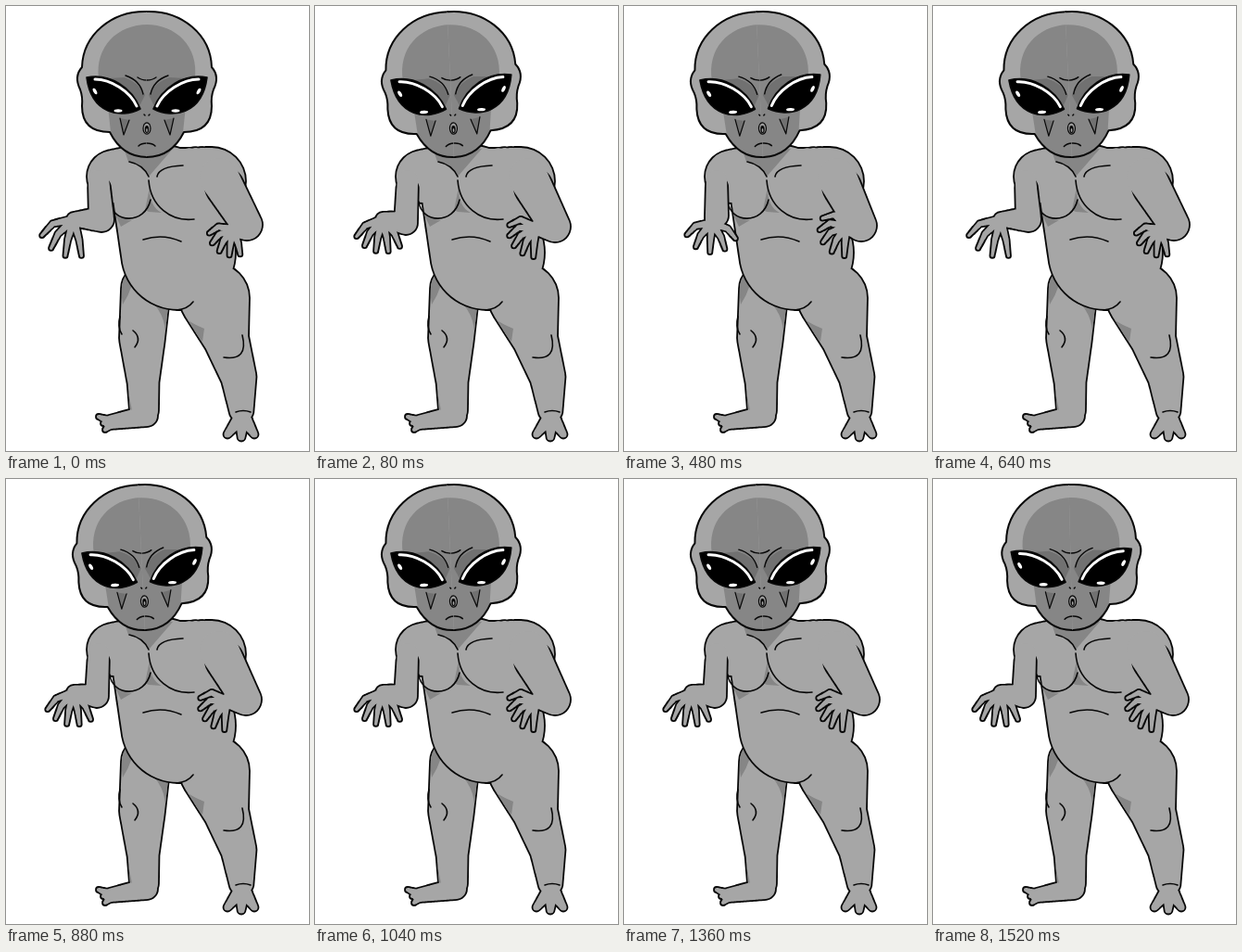
Animation of 327 by 480 pixels, one loop 1.6 s. Source, as an HTML page with a canvas:

```html
<!DOCTYPE html>
<html lang="en">
<head>
<meta charset="utf-8">
<title>Wiggling alien</title>
<style>
html, body { margin: 0; width: 100%; height: 100%; overflow: hidden; background: #fff; }
canvas { display: block; width: 327px; height: 480px; }
</style>
</head>
<body>
<canvas id="stage" width="327" height="480"></canvas>
<script>
const ctx = document.getElementById('stage').getContext('2d');
const SKIN = '#a6a6a6', SHADE = '#868686', DARK = '#717171', INK = '#080808';
const STEP = 80;
const HAND_CYCLE = [0, 1, 2, 1];
const HEAD_CYCLE = [0, -0.047, -0.047, -0.047, -0.025];

const mix = (a, b, t) => a + (b - a) * t;
const mixAll = (a, b, t) => a.map((v, i) => mix(v, b[i], t));

function fill(path, color) {
  ctx.fillStyle = color;
  ctx.fill(path);
}

function stroke(d, width = 1.6, color = INK) {
  ctx.lineWidth = width;
  ctx.strokeStyle = color;
  ctx.stroke(typeof d === 'string' ? new Path2D(d) : d);
}

// Union of tapered limbs; a limb is a chain of circles [x, y, radius]
function limbs(chains, grow) {
  const path = new Path2D();
  for (const chain of chains) {
    for (let i = 1; i < chain.length; i++) {
      const [a, b] = [chain[i - 1], chain[i]];
      const steps = Math.ceil(Math.hypot(b[0] - a[0], b[1] - a[1]));
      for (let s = 0; s <= steps; s++) {
        const [x, y, r] = mixAll(a, b, s / steps);
        path.moveTo(x + r + grow, y);
        path.arc(x, y, r + grow, 0, 2 * Math.PI);
      }
    }
  }
  return path;
}

const flesh = (chains, inked = chains) =>
  ({ ink: limbs(inked, 0.9), skin: limbs(chains, -0.9) });

function drawFlesh({ ink, skin }, shade) {
  fill(ink, INK);
  fill(skin, SKIN);
  if (!shade) return;
  ctx.save();
  ctx.clip(skin);
  fill(new Path2D(shade), SHADE);
  ctx.restore();
}

const toes = (ankle, tips, r) => tips.map(([x, y]) => [ankle, [x, y, r]]);

const leftLeg = flesh([
  [[151, 305, 27], [147, 358, 25], [148, 405, 17.5], [149, 436, 16]],
  [[152, 442, 12], [112, 449, 8]],
  ...toes([116, 449, 6], [[100, 443], [105, 450], [107, 457]], 3)
]);
const leftLegShade = 'M120 275H140Q140 300 126 322ZM142 306L190 325L172 352Q171 325 142 306Z' +
  'M118 370Q130 400 136 436L126 430Z';

const body = flesh([
  [[116, 184, 29], [158, 168, 22]],
  [[222, 189, 37], [168, 176, 22]],
  [[170, 205, 55], [186, 266, 62]],
  [[225, 315, 38], [237, 358, 25], [251, 400, 19.5], [254, 436, 13.5]],
  ...toes([255, 442, 9], [[239, 462], [254, 465], [268, 462]], 4.5)
]);
const bodyShade = 'M126 150L180 154L154 184Q147 172 132 168Z' +
  'M155 196Q155 217 168 223L154 222L150 220Z' +
  'M112 213Q119 230 136 231L124 238Z' +
  'M178 326Q196 341 214 348L212 362Z';
const bodyLines = [
  'M133 168Q148 171 154 184', 'M163 184Q165 173 191 172',
  'M112 211C115 235 150 236 156 209', 'M154 188C156 216 178 233 203 230',
  'M148 252Q169 245 189 254', 'M184 328Q196 327 202 319',
  'M137 350Q147 358 139 368', 'M123 335Q120 346 125 354',
  'M255 355Q262 383 235 379', 'M248 438Q256 435 264 438'
];

// Fingers fan out evenly between two angles and droop at the knuckle
function fan([x, y], from, to, count, reach) {
  return Array.from({ length: count }, (_, i) => {
    const angle = mix(from, to, i / (count - 1));
    const droop = mix(angle, 90, 0.45);
    const point = (px, py, deg, len, r) =>
      [px + len * Math.cos(deg * Math.PI / 180), py + len * Math.sin(deg * Math.PI / 180), r];
    const knuckle = point(x, y, angle, reach, 3.7);
    return [[x, y, 5], knuckle, point(...knuckle.slice(0, 2), droop, reach * 0.75, 2.6)];
  });
}

function makeArm(shoulder, elbow, palm, from, to, count, reach) {
  const hand = fan(palm, from, to, count, reach);
  const forearm = [elbow, [...palm, 8]];
  const armpit = mixAll(shoulder, elbow, 0.2);
  return flesh([[shoulder, elbow], forearm, ...hand], [[armpit, elbow], forearm, ...hand]);
}

const LEFT = [100, 188, 12], RIGHT = [230, 185, 22];
const leftArms = [
  makeArm(LEFT, [103, 230, 14], [73, 230], 168, 75, 4, 23),
  makeArm(LEFT, [98, 234, 13], [73, 230], 160, 50, 5, 20),
  makeArm(LEFT, [100, 226, 13], [95, 234], 170, 20, 5, 18)
];
const rightArms = [
  makeArm(RIGHT, [260, 236, 17], [245, 241], 190, 70, 5, 16),
  makeArm(RIGHT, [259, 238, 17], [238, 239], 208, 95, 5, 18),
  makeArm(RIGHT, [256, 237, 17], [240, 238], 225, 95, 5, 18)
];

// Head shapes are the right half, measured from the face's centre line
const headHalf = new Path2D('M-1 6C38 5 69 31 70 66Q79 76 72 90Q69 98 70 108' +
  'C70 128 58 136 40 136C33 150 22 163 -1 163Z');
const headEdge = new Path2D('M0 6C38 5 69 31 70 66Q79 76 72 90Q69 98 70 108' +
  'C70 128 58 136 40 136C33 150 22 163 0 163');
const faceHalf = new Path2D('M-1 20C32 20 56 44 52 78L42 108L39 136C32 150 22 163 -1 163Z');
const browShade = new Path2D('M24 77Q9 82 2 96L8 108Q18 88 42 78Z');
const cheekShade = new Path2D('M19 123L29 121L25 140Z');
const eye = new Path2D('M65 77C40 72 16 88 7 111C28 122 60 117 65 77Z');

function ellipse(x, y, rx, ry, color, turn = 0) {
  ctx.beginPath();
  ctx.ellipse(x, y, rx, ry, turn, 0, 2 * Math.PI);
  ctx.fillStyle = color;
  ctx.fill();
}

function drawHalfFace() {
  fill(headHalf, SKIN);
  fill(faceHalf, SHADE);
  fill(browShade, DARK);
  fill(cheekShade, DARK);
  stroke(headEdge, 2);
  fill(eye, '#000');
  stroke(eye);
  stroke('M56 79C39 79 18 92 11 108', 3, '#fff');
  ellipse(31, 113, 4.5, 1.7, '#fff');
  ellipse(56, 92, 1.8, 3.6, '#fff', 0.5);
  stroke('M23 75C11 79 6 86 4 95', 1.4);
  stroke('M0 80Q6 80 10 77', 1.4);
  stroke('M19 123L25 139M29 121L25 139', 1.2);
  stroke('M0 148Q6 148 9 151', 1.5);
  stroke('M2 118L3 117', 1.4);
}

function drawHead(angle) {
  ctx.save();
  ctx.translate(152 + angle * 25, 161);
  ctx.rotate(angle);
  ctx.translate(0, -161);
  for (const side of [-1, 1]) {
    ctx.save();
    ctx.scale(side, 1);
    drawHalfFace();
    ctx.restore();
  }
  ellipse(0, 132, 4.6, 6.8, INK);
  ellipse(0, 132, 3.4, 5.5, '#999');
  ellipse(0, 133, 2.2, 4, INK);
  ellipse(0, 134, 0.8, 2, '#aaa');
  ctx.restore();
}

function draw(now) {
  const tick = Math.floor(now / STEP);
  const pose = HAND_CYCLE[tick % HAND_CYCLE.length];
  ctx.fillStyle = '#fff';
  ctx.fillRect(0, 0, 327, 480);
  ctx.lineCap = ctx.lineJoin = 'round';
  drawFlesh(leftLeg, leftLegShade);
  drawFlesh(body, bodyShade);
  bodyLines.forEach(line => stroke(line));
  drawFlesh(leftArms[pose]);
  drawFlesh(rightArms[pose]);
  drawHead(HEAD_CYCLE[tick % HEAD_CYCLE.length]);
}

const start = performance.now();
function loop() {
  draw(performance.now() - start);
  requestAnimationFrame(loop);
}
loop();
</script>
</body>
</html>
```
